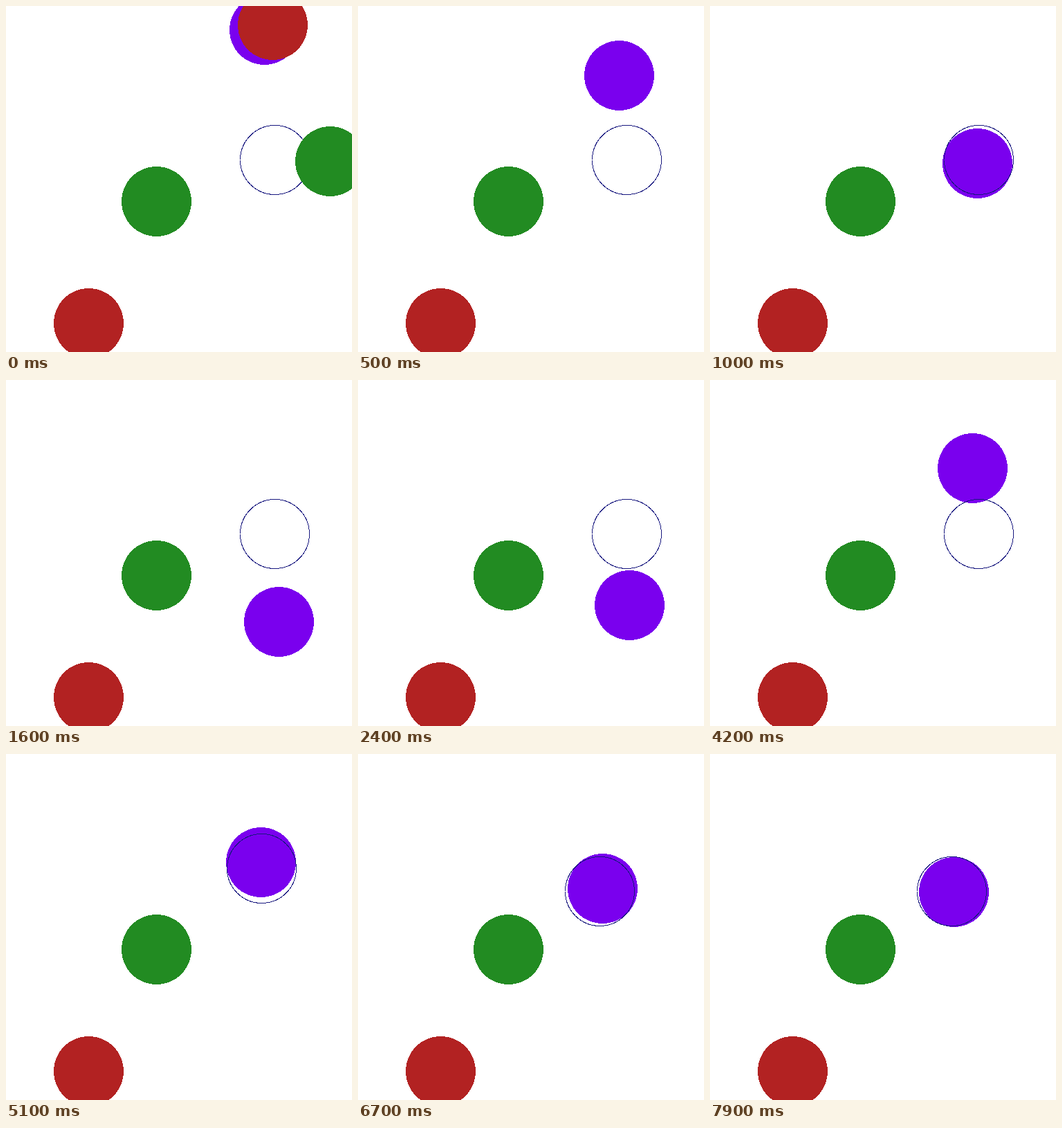
Write an HTML page that moves like this. It is 500 px wide and 500 px high and loops after 8000 ms.

```html
<!DOCTYPE html>
<html>
<head>
<meta charset="utf-8">
<style>
html, body { margin: 0; width: 100%; height: 100%; overflow: hidden; background: #fff; }
svg { display: block; width: 500px; height: 500px; }
.red { fill: #b22222; }
.green { fill: #228b22; }
#ball { fill: #7a00ee; }
#ring { fill: none; stroke: #191980; stroke-dasharray: 156.08 1; stroke-dashoffset: -.5; }
</style>
</head>
<body>
<svg viewBox="0 0 500 500" shape-rendering="crispEdges">
  <circle class="red" cx="119.5" cy="458.5" r="50.5"/>
  <circle class="green" cx="217.5" cy="282.5" r="50.5"/>
  <circle id="ball" r="50.5"/>
  <circle id="ring" r="50"/>
  <g id="flash">
    <circle class="red" cx="385.5" cy="27.5" r="50.5"/>
    <circle class="green" cx="468.5" cy="224.5" r="50.5"/>
  </g>
</svg>
<script>
const STEP = 100, COUNT = 80, PULL = 0.0256, DRAG = 0.973;
// Each stage stops the ball, then pulls it towards a new rest point.
const stages = [
  { at: 0, rest: [385.5, 222], ring: [388, 222] },
  { at: 43, rest: [364.2, 165.7], ring: [369, 165] },
  { at: 58, rest: [353.1, 195.45], ring: [349, 198] },
  { at: 76, rest: [357, 178.5], ring: [349, 198] }
];

function simulate() {
  const poses = [];
  let pos = [373, 34], speed = [0, 0], stage;
  for (let n = 0; n < COUNT; n++) {
    const next = stages.find(s => s.at === n);
    if (next) {
      stage = next;
      speed = [0, 0];
    } else {
      speed = speed.map((v, i) => v * DRAG + PULL * (stage.rest[i] - pos[i]));
      pos = pos.map((p, i) => p + speed[i]);
    }
    poses.push({ ball: pos.map(Math.round), ring: stage.ring });
  }
  return poses;
}

const poses = simulate();
const get = id => document.getElementById(id);
const ball = get('ball'), ring = get('ring'), flash = get('flash');

function place(el, [x, y]) {
  el.setAttribute('cx', x + 0.5);
  el.setAttribute('cy', y + 0.5);
}

function draw(time) {
  const n = Math.floor(Math.max(0, time - start) / STEP) % COUNT;
  place(ball, poses[n].ball);
  place(ring, poses[n].ring);
  flash.style.display = n ? 'none' : '';
  requestAnimationFrame(draw);
}

const start = performance.now();
draw(start);
</script>
</body>
</html>
```
